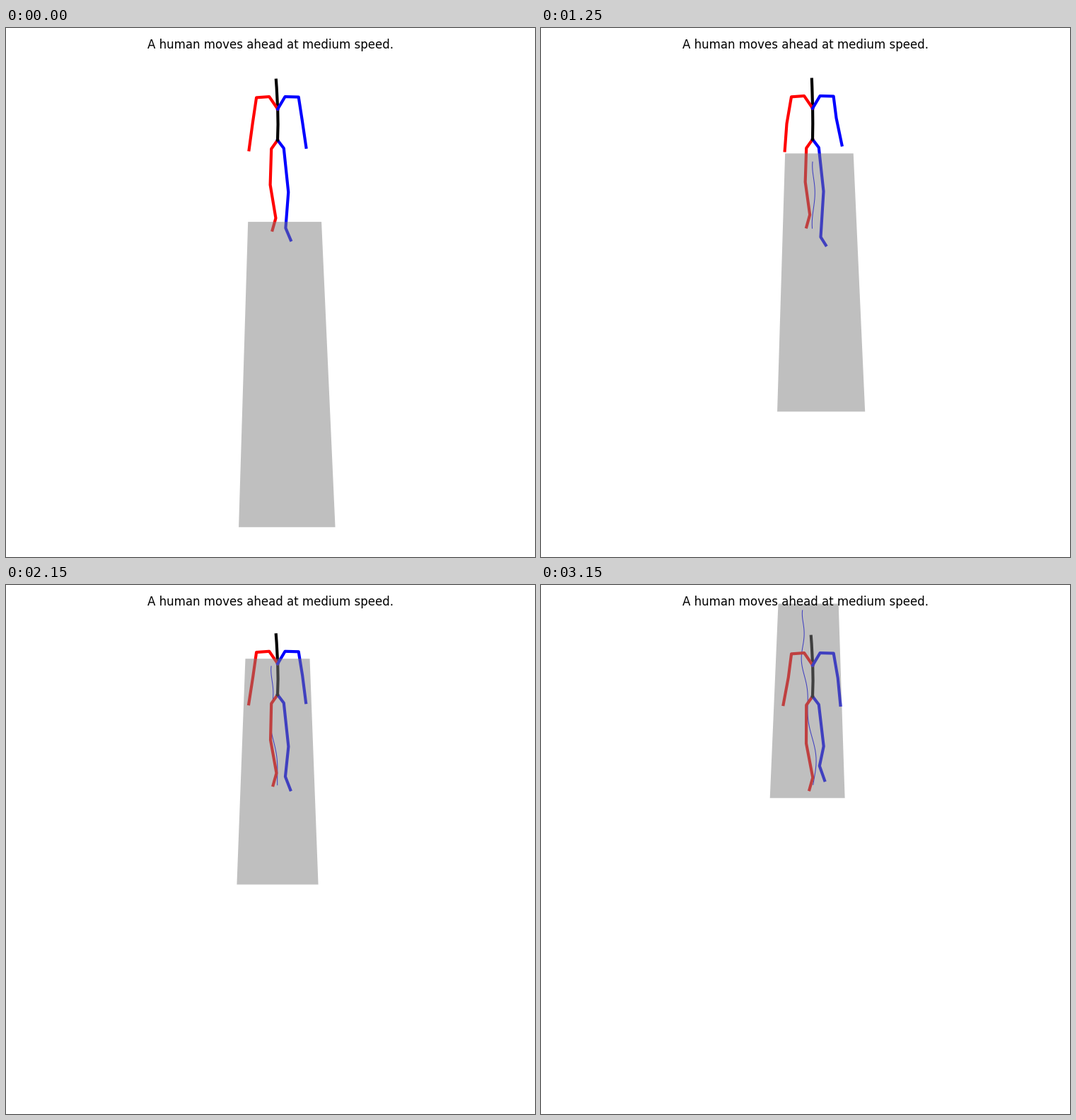
A matplotlib script that plays this animation: 748 px wide and 748 px high, repeating every 3200 ms.

```python
import numpy as np
import matplotlib.pyplot as plt
from matplotlib.animation import FuncAnimation

SIZE, DPI = 748, 100
FRAMES, INTERVAL = 64, 50
CX = 384                            # screen x of the walker
HORIZON, DEPTH = -1101.6, 7.1963    # floor perspective, depth of the walker
STEP = 10.6                         # duration of one step in frames
LEFT, RIGHT = 1, -1
TITLE = "A human moves ahead at medium speed."

# Leg segments over one stride, at eight even moments from toe-off on:
# how far each reaches down the screen and away from the body
THIGH = [42.5, 54.5, 62, 62, 62, 57, 51, 48]
SHANK = [29.5, 20, 48.5, 64.5, 63, 51.5, 47, 46.5]
FOOT = [20, 21, 17.5, 11.5, 12.3, 16.5, 17, 17.3]
KNEE_OUT = [4.8, 7, 6.5, 6.7, 4.5, 0, 1.5, 1.5]
ANKLE_OUT = [-5, -6.5, -4, -4, -4.7, -9, -8, -6.5]


def cycle(values, angle):
    """Smooth periodic curve through evenly spaced values."""
    c = np.fft.rfft(values) / len(values)
    c[1:-1] *= 2
    return np.sum(c * np.exp(1j * angle * np.arange(len(c)))).real


def smoothstep(a, b, t):
    s = np.clip((t - a) / (b - a), 0, 1)
    return s * s * (3 - 2 * s)


def stride(t):
    """Gait angle of the left leg; the first step is a little slower."""
    return np.pi / STEP * (t + 4.2 + 1.3 * np.exp(-(t / 9) ** 2))


def ahead(t):
    return .02248 * t + .0000575 * t ** 2 - .049 * (1 - np.exp(-t / 6.3))


def sway(t):
    drift = 1 + 13.4 * smoothstep(21, 59, t)
    swing = (1.2 + .02 * t) * np.cos(np.pi / STEP * (t - 12.5))
    return (drift + swing) / 1000


def limb(root, side, steps):
    """Joints reached from root by (outward, down) steps."""
    return root + np.cumsum([(0, 0), *steps], axis=0) * (side, 1)


def leg(pelvis, side, a):
    return limb(pelvis, side, [
        (8.8, 12 - .4 * side),
        (cycle(KNEE_OUT, a), cycle(THIGH, a)),
        (cycle(ANKLE_OUT, a), cycle(SHANK, a)),
        (6 + 1.2 * side, cycle(FOOT, a))])


def arm(chest, side, a):
    return limb(chest, side, [
        (11.2 - .8 * side, -17.5),
        (18.6 + .5 * side, .9 - .4 * side),
        (5.2 + 1.8 * np.cos(a), 34.3 + 4 * np.cos(a + .3)),
        (5.4 - 3.6 * np.cos(a), 38.2)])


def walker(t):
    a = stride(t)
    bob = 4 * (1 - np.exp(-t / 4)) * np.cos(2 * a - .3)
    lean = np.cos(a - 1.33)
    # pelvis, waist, chest, neck, head
    spine = np.column_stack([
        CX + lean * np.array([0, .6, .2, -1.4, -2.2]),
        bob + np.array([158.5, 136.5, 114.6, 84.5, 73.7])])
    pelvis, chest = spine[0], spine[2]
    b = a + np.pi
    return [leg(pelvis, RIGHT, b), leg(pelvis, LEFT, a), spine,
            arm(chest, RIGHT, b), arm(chest, LEFT, a)]


def ground(side, back):
    """Project floor points, given relative to the walker, to the screen."""
    q = 1e4 / (DEPTH + np.asarray(back))
    return np.column_stack([CX + np.asarray(side) * q, HORIZON + q])


fig = plt.figure(figsize=(SIZE / DPI, SIZE / DPI), dpi=DPI, facecolor="white")
ax = fig.add_axes([0, 0, 1, 1])
ax.set(xlim=(0, SIZE), ylim=(SIZE, 0))
ax.axis("off")
fig.text(.5, .98, TITLE, ha="center", va="top", color="black",
         family="DejaVu Sans", fontsize=12)

trail, = ax.plot([], [], color="blue", lw=.75, zorder=1)
limbs = [ax.plot([], [], color=c, lw=3, zorder=2 + i)[0]
         for i, c in enumerate(["red", "blue", "black", "red", "blue"])]
floor = plt.Polygon(np.zeros((4, 2)), facecolor=(.5, .5, .5, .5),
                    edgecolor="none", lw=0, zorder=10)
ax.add_patch(floor)


def update(n):
    left, right = -.0304 - sway(n), .0451 - sway(n)
    far, near = ahead(n) + .0727, ahead(n) - 1.6635
    floor.set_xy(ground([left, left, right, right], [near, far, far, near]))
    past = np.arange(n)
    trail.set_data(*ground(sway(past) - sway(n), ahead(n) - ahead(past)).T)
    for line, joints in zip(limbs, walker(n)):
        line.set_data(*joints.T)
    return [trail, floor, *limbs]


anim = FuncAnimation(fig, update, frames=FRAMES, interval=INTERVAL,
                     repeat=True, repeat_delay=0, blit=False)
plt.show()
```
